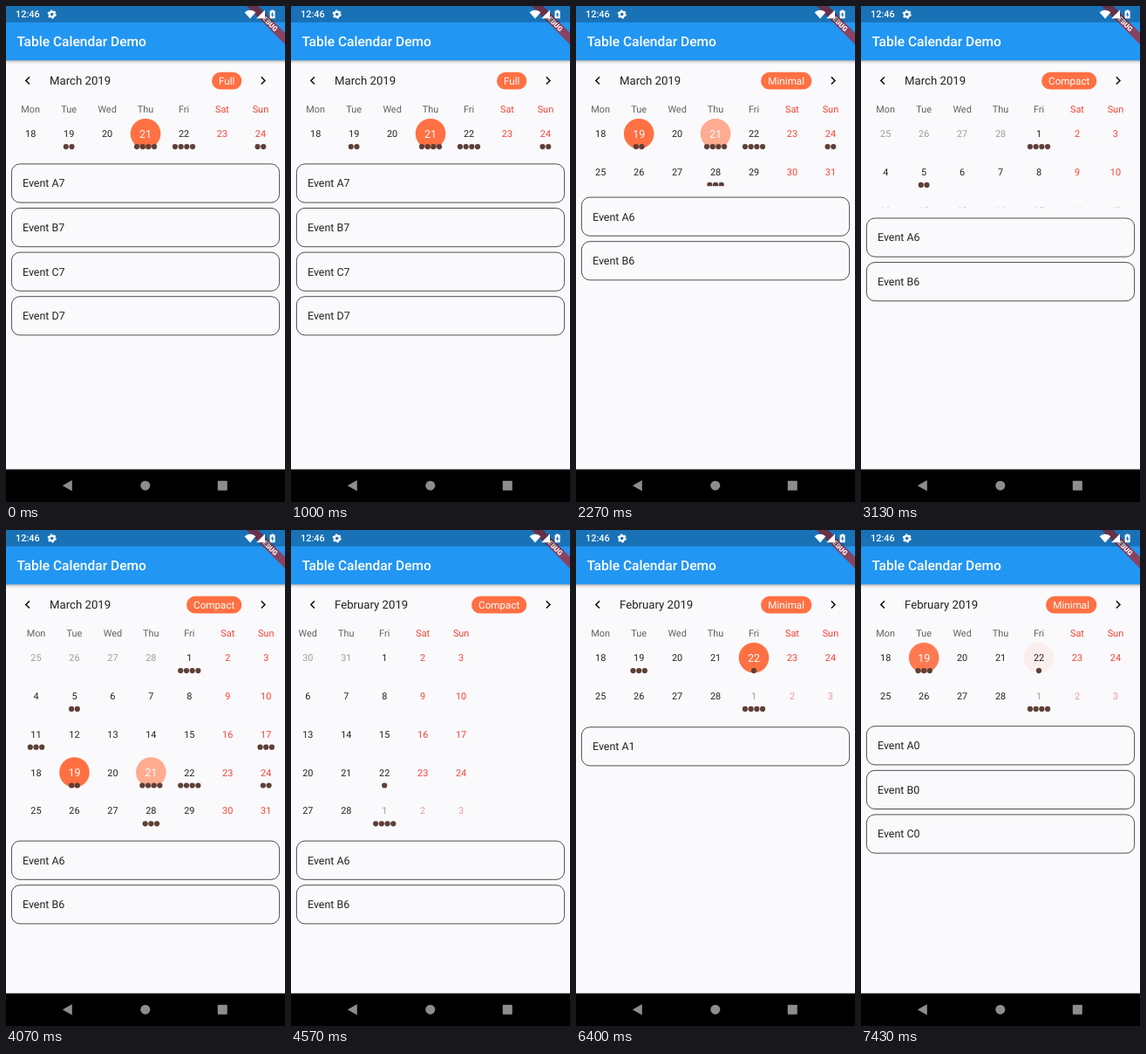
These frames come from a looping animation (320 px wide and 568 px high, 8 s). An HTML page:

```html
<!DOCTYPE html>
<html lang="en">
<head>
<meta charset="utf-8">
<title>Table Calendar Demo</title>
<style>
html, body { margin: 0; width: 100%; height: 100%; overflow: hidden; background: #faf9fc; }
svg { display: block; width: 320px; height: 568px; font-family: Roboto, sans-serif; text-rendering: geometricPrecision; }
.mid { text-anchor: middle; }
</style>
</head>
<body>
<svg viewBox="0 0 320 568">
  <defs>
    <clipPath id="tableClip"><rect id="clipRect" y="100" width="320" height="68"/></clipPath>
    <linearGradient id="shade" x2="0" y2="1">
      <stop stop-color="#000" stop-opacity=".32"/>
      <stop offset=".4" stop-color="#000" stop-opacity=".1"/>
      <stop offset="1" stop-color="#000" stop-opacity="0"/>
    </linearGradient>
  </defs>
  <rect width="320" height="568" fill="#faf9fc"/>

  <text id="month" x="50" y="90.2" font-size="13.2" fill="#212121"></text>
  <g fill="#111">
    <path transform="translate(15.5 76.1) scale(.778)" d="M15.41 7.41L14 6l-6 6 6 6 1.41-1.41L10.83 12z"/>
    <path transform="translate(285.6 76.1) scale(.778)" d="M10 6L8.59 7.41 13.17 12l-4.58 4.59L10 18l6-6z"/>
  </g>
  <rect id="pill" y="75.8" height="19.8" rx="9.9" fill="#ff7043"/>
  <text id="pillText" class="mid" y="89.8" font-size="11.67" fill="#fff"></text>

  <g clip-path="url(#tableClip)"><g id="table"></g></g>
  <g id="list"></g>

  <rect y="62" width="320" height="5" fill="url(#shade)"/>
  <rect width="320" height="62.2" fill="#2196f3"/>
  <text x="12.4" y="46.3" font-size="15.56" font-weight="500" fill="#fff">Table Calendar Demo</text>
  <g transform="translate(320 0) rotate(45)">
    <rect x="-31.1" y="21.8" width="62.2" height="9.3" fill="#b71c1c" fill-opacity=".68"/>
    <text class="mid" y="29.2" font-size="7.9" font-weight="900" fill="#fff">DEBUG</text>
  </g>
  <rect width="320" height="18.7" fill="#000" fill-opacity=".25"/>

  <g fill="#fff">
    <text x="11" y="13.4" font-size="10.9" font-weight="500">12:46</text>
    <circle cx="52.7" cy="9.5" r="2.9" fill="none" stroke="#fff" stroke-width="2.2"/>
    <circle cx="52.7" cy="9.5" r="4.3" fill="none" stroke="#fff" stroke-width="1.6" stroke-dasharray="2.25 2.25"/>
    <path d="M273.6 7.2Q280 2.4 286.4 7.2L280 14.4z"/>
    <path d="M297 4.6V14.2H287.2z"/>
    <path d="M302.6 5.4h1.8V4.4h2.4v1h1.8v8.9h-6z"/>
    <path d="M306 6.6l-2.2 3.8h1.5v2.8l2.2-3.8H306z" fill="#1970b6"/>
  </g>

  <rect y="530.6" width="320" height="37.4"/>
  <g fill="#8d8d8d">
    <path d="M64.8 549.2L75.8 543v12.4z"/>
    <circle cx="159.8" cy="549.2" r="5.5"/>
    <rect x="242.8" y="543.8" width="11" height="11" rx=".8"/>
  </g>
</svg>
<script>
const LOOP = 8000, ROW = 43.8, COL = 43.95, LEFT = 28.2, TOP = 146.2;
const DAY_MS = 864e5;
const SLIDE = { start: 4070, swap: 4400, end: 4750 };
const TODAY = '3/21';
const WEEKDAYS = ['Mon', 'Tue', 'Wed', 'Thu', 'Fri', 'Sat', 'Sun'];
const PILL_WIDTH = { Full: 34.2, Minimal: 58.2, Compact: 63.2 };
const EVENT_COUNT = {
  '2/19': 3, '2/22': 1, '3/1': 4, '3/5': 2, '3/11': 3, '3/17': 3,
  '3/19': 2, '3/21': 4, '3/22': 4, '3/24': 2, '3/28': 3
};

// lead: how far the animation has run when its first frame appears
const FORMATS = [
  { at: 0, lead: 999, rows: 1, label: 'Full' },
  { at: 2130, lead: 55, rows: 2, label: 'Minimal' },
  { at: 3130, lead: 66, rows: 5, label: 'Compact' },
  { at: 6170, lead: 60, rows: 2, label: 'Minimal' }
];
const TAPS = [
  { at: 0, lead: 999, settle: 0, day: '3/21', id: 7 },
  { at: 1430, lead: 30, settle: 2130, day: '3/19', id: 6 },
  { at: 5400, lead: 0, settle: 6170, day: '2/22', id: 1 },
  { at: 7230, lead: 30, settle: LOOP, day: '2/19', id: 0 }
];

const $ = id => document.getElementById(id);
const indexAt = (steps, t) => steps.filter(s => s.at <= t).length - 1;
const mix = (a, b, p) => a + (b - a) * p;

// cubic-bezier(.4, 0, .2, 1)
function fastOutSlowIn(x) {
  if (x >= 1) return 1;
  let lo = 0, hi = 1, s;
  for (let i = 0; i < 20; i++) {
    s = (lo + hi) / 2;
    const bx = 1.2 * s * (1 - s) ** 2 + .6 * s * s * (1 - s) + s ** 3;
    if (bx < x) lo = s; else hi = s;
  }
  return 3 * s * s * (1 - s) + s ** 3;
}

function slideOffset(t) {
  if (t < SLIDE.start || t >= SLIDE.end) return 0;
  if (t < SLIDE.swap) return 6 + 320 * ((t - SLIDE.start) / (SLIDE.swap - SLIDE.start)) ** 1.2;
  return -370 * ((SLIDE.end - t) / (SLIDE.end - SLIDE.swap)) ** 2;
}

const text = (x, y, size, fill, str) =>
  `<text class="mid" x="${x}" y="${y}" font-size="${size}" fill="${fill}">${str}</text>`;

// Circle paint as [r, g, b, alpha]
function circlePaint(key, selected) {
  if (key === selected) return [255, 112, 67, 1];
  if (key === TODAY) return [255, 171, 145, 1];
  return null;
}

function blendPaint(from, to, p) {
  if (!from && !to) return null;
  const a = from || [...to.slice(0, 3), 0], b = to || [...from.slice(0, 3), 0];
  return a.map((v, i) => mix(v, b[i], p));
}

function dayCell(date, col, row, month, selection) {
  const x = LEFT + col * COL, y = TOP + row * ROW;
  const m = date.getUTCMonth() + 1, key = `${m}/${date.getUTCDate()}`;
  const { day, previous, progress } = selection;
  const paint = blendPaint(circlePaint(key, previous), circlePaint(key, day), progress);
  const marked = key === day || key === TODAY;
  const weekend = col > 4, outside = m !== month;
  const color = marked ? '#fff'
    : weekend ? (outside ? '#ef9a9a' : '#f44336')
    : outside ? '#9e9e9e' : '#222';
  let out = paint ? `<circle cx="${x}" cy="${y}" r="17.3" fill="rgba(${paint})"/>` : '';
  out += text(x, y + (marked ? 4.4 : 3.9), marked ? 12.44 : 10.9, color, date.getUTCDate());
  const count = EVENT_COUNT[key] || 0;
  for (let i = 0; i < count; i++)
    out += `<circle cx="${x + (i - (count - 1) / 2) * 6.7}" cy="${y + 14.9}" r="3.1" fill="#5d4037"/>`;
  return out;
}

function tableMarkup(month, rows, selection) {
  const first = rows < 5 ? Date.UTC(2019, month - 1, 18)
    : month === 3 ? Date.UTC(2019, 1, 25) : Date.UTC(2019, 0, 28);
  let out = WEEKDAYS.map((name, i) =>
    text(LEFT + i * COL, 122, 10.9, i > 4 ? '#f44336' : '#616161', name)).join('');
  for (let i = 0; i < rows * 7; i++)
    out += dayCell(new Date(first + i * DAY_MS), i % 7, Math.floor(i / 7), month, selection);
  return out;
}

function listMarkup(count, id, top) {
  let out = '';
  for (let i = 0; i < count; i++) {
    const y = top + i * 50.6;
    out += `<rect x="6.4" y="${y}" width="307.2" height="44.2" rx="9.5" fill="none" stroke="#222" stroke-width=".8"/>
      <text x="19" y="${y + 26.5}" font-size="12.44" fill="#222">Event ${'ABCD'[i]}${id}</text>`;
  }
  return out;
}

function draw(t) {
  const f = indexAt(FORMATS, t), format = FORMATS[f];
  const fromRows = f ? FORMATS[f - 1].rows : format.rows;
  const grow = fastOutSlowIn((t - format.at + format.lead) / 330);
  const bottom = TOP + ROW * (mix(fromRows, format.rows, grow) - .5);

  const s = indexAt(TAPS, t), tap = TAPS[s];
  const selection = {
    day: tap.day,
    previous: s ? TAPS[s - 1].day : tap.day,
    progress: t >= tap.settle ? 1 : Math.min(.92, (t - tap.at + tap.lead) / 250)
  };

  const month = t < SLIDE.swap ? 3 : 2;
  $('month').textContent = (month === 3 ? 'March' : 'February') + ' 2019';

  const width = PILL_WIDTH[format.label];
  $('pill').setAttribute('x', 270.3 - width);
  $('pill').setAttribute('width', width);
  $('pillText').setAttribute('x', 270.3 - width / 2);
  $('pillText').textContent = format.label;

  $('clipRect').setAttribute('height', bottom - 100);
  $('table').setAttribute('transform', `translate(${slideOffset(t)} 0)`);
  $('table').innerHTML = tableMarkup(month, format.rows, selection);
  $('list').innerHTML = listMarkup(EVENT_COUNT[tap.day], tap.id, bottom + 12.8);
}

const start = performance.now();
function tick() {
  draw((performance.now() - start) % LOOP);
  requestAnimationFrame(tick);
}
tick();
</script>
</body>
</html>
```
